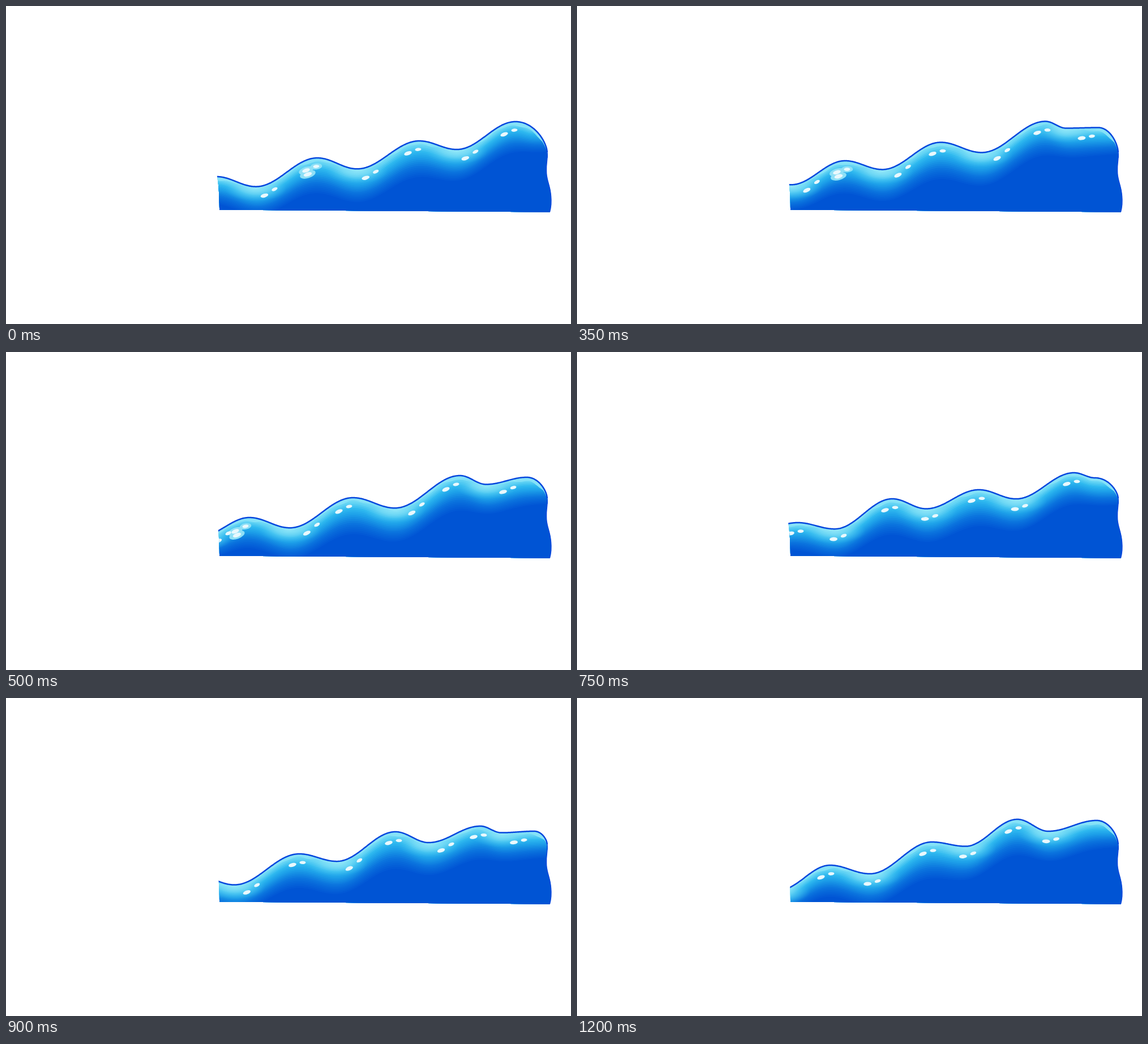
An HTML page with a canvas for the animation above (1350 ms loop, 998 px wide and 561 px high).

```html
<!DOCTYPE html>
<html lang="en">
<head>
<meta charset="utf-8">
<title>Water waves</title>
<style>
  html, body { margin: 0; width: 100%; height: 100%; overflow: hidden; background: #fff; }
  canvas { display: block; }
</style>
</head>
<body>
<canvas id="stage" width="998" height="561"></canvas>
<script>
const ctx = document.getElementById('stage').getContext('2d');
const LOOP = 1350;
const LEFT = 368, RIGHT = 956;
const END_Y = 258;

// A pose is its crests; shine is how far the glints sit from each crest and trough.
const pose = (crests, onCrest, inTrough, foam = false) => ({ crests, onCrest, inTrough, foam });

const swell = pose([[372, 301], [550, 268], [730, 238], [900, 204]], -20, 15, true);
const shoulder = pose([[345, 308], [517, 270], [672, 240], [853, 205], [922, 224]], -4, 25, true);
const twin = pose([[290, 312], [430, 292], [613, 257], [802, 218], [920, 221]], -25, 30, true);
const steep = pose([[225, 300], [390, 301], [557, 259], [710, 243], [878, 213], [915, 222]], -13, -2);
const low = pose([[330, 310], [518, 275], [688, 236], [838, 226], [933, 235]], -12, 22);
const trough = pose([[300, 330], [447, 295], [627, 254], [778, 214], [918, 216]], -16, -4);

function between(a, b, lift) {
  const mid = (p, q) => (p + q) / 2;
  const crests = a.crests.map(([x, y], i) => {
    // steep has one more wave on the left of its matching crest
    const [bx, by] = b.crests[i];
    return [mid(x, bx), mid(y, by) - lift];
  });
  return pose(crests, mid(a.onCrest, b.onCrest), mid(a.inTrough, b.inTrough), a.foam && b.foam);
}

const steps = [
  [0, swell],
  [150, shoulder],
  [350, between(shoulder, twin, 8)],
  [500, twin],
  [600, between(twin, steep, 5)],
  [750, steep],
  [900, low],
  [1050, between(low, trough, -3)],
  [1200, trough]
];

// Wide gaps between crests sag into a trough; narrow ones only form a shoulder.
function troughsOf(crests) {
  return crests.slice(1).flatMap(([x, y], i) => {
    const [px, py] = crests[i], gap = x - px;
    if (gap < 80) return [];
    return [[px + gap * 0.39, py + (y - py) * 0.39 + (gap - 65) * 0.27]];
  });
}

// Cosine slopes between turning points, then a rounded shoulder down to the right end.
function surface(turns) {
  const [lastX, lastY] = turns[turns.length - 1];
  const ys = [];
  for (let x = LEFT, k = 0; x <= RIGHT; x++) {
    if (x >= lastX) {
      const u = (x - lastX) / (RIGHT - lastX);
      ys.push(lastY + (END_Y - lastY) * (1 - (1 - u * u) ** 0.65));
      continue;
    }
    while (x > turns[k + 1][0]) k++;
    const [ax, ay] = turns[k], [bx, by] = turns[k + 1];
    const t = Math.max(0, (x - ax) / (bx - ax));
    ys.push(ay + (by - ay) * (1 - Math.cos(Math.PI * t)) / 2);
  }
  return ys;
}

function smooth(ys, radius) {
  const r = Math.round(radius), last = ys.length - 1;
  const box = src => src.map((_, i) => {
    let sum = 0;
    for (let j = i - r; j <= i + r; j++) sum += src[Math.min(last, Math.max(0, j))];
    return sum / (2 * r + 1);
  });
  return box(box(ys));
}

const ramp = [[0, 130, 225, 247], [8, 96, 210, 244], [17, 46, 184, 239], [27, 28, 158, 232], [42, 10, 113, 221], [59, 0, 84, 212]];
function shade(depth) {
  const k = Math.max(1, ramp.findIndex(stop => stop[0] >= depth));
  const a = ramp[k - 1], b = ramp[k];
  const t = (depth - a[0]) / (b[0] - a[0]);
  return `rgb(${[1, 2, 3].map(i => Math.round(a[i] + (b[i] - a[i]) * t))})`;
}

const trace = ys => ys.forEach((y, i) => ctx.lineTo(LEFT + i, y));

function rightEdge() {
  ctx.bezierCurveTo(957, 272, 954, 276, 954.5, 290);
  ctx.bezierCurveTo(954, 308, 961, 314, 962.5, 335);
  ctx.quadraticCurveTo(964, 350, 960.5, 363);
}

function fillBelow(ys, color) {
  ctx.fillStyle = color;
  ctx.beginPath();
  ctx.moveTo(LEFT, 370);
  trace(ys);
  ctx.lineTo(970, ys[ys.length - 1]);
  ctx.lineTo(970, 370);
  ctx.fill();
}

function glow(x, y) {
  ctx.save();
  ctx.translate(x, y + 3);
  ctx.scale(1, 0.42);
  const light = ctx.createRadialGradient(0, 0, 0, 0, 0, 55);
  light.addColorStop(0, 'rgba(146,231,248,.8)');
  light.addColorStop(0.45, 'rgba(126,222,246,.5)');
  light.addColorStop(1, 'rgba(70,195,240,0)');
  ctx.fillStyle = light;
  ctx.fillRect(-60, -60, 120, 120);
  ctx.restore();
}

function oval(x, y, rx, ry, tilt, color) {
  ctx.fillStyle = color;
  ctx.beginPath();
  ctx.ellipse(x, y, rx, ry, tilt, 0, Math.PI * 2);
  ctx.fill();
}

function drawDepth(ys) {
  // shading stays level below the steep right end
  const calm = ys.map((_, i) => ys[Math.min(i, 925 - LEFT)]);
  const reach = i => 0.78 + 0.27 * Math.sin(Math.PI * i / ys.length);
  fillBelow(ys, shade(0));
  for (let d = 2; d <= 59; d += 3) {
    const soft = smooth(calm, d * 0.38);
    fillBelow(soft.map((y, i) => y + d * reach(i)), shade(d));
  }
}

function drawRim(ys) {
  const wide = smooth(ys, 22);
  ctx.fillStyle = '#86e2f7';
  ctx.beginPath();
  trace(ys);
  for (let i = ys.length - 1; i >= 0; i--) {
    const crest = Math.max(0, wide[i] - ys[i]);
    const wobble = Math.sin(i / 5) + Math.sin(i / 8.3);
    ctx.lineTo(LEFT + i, ys[i] + 4.5 + Math.min(5, crest * 0.6) + wobble * 0.8);
  }
  ctx.fill();
}

function drawGlints(ys, x, foam) {
  const at = px => ys[Math.min(ys.length - 1, Math.max(0, Math.round(px) - LEFT))];
  const spots = [[x, 18, 7], [x + 18, 15, 5.5]];
  if (foam) spots.push([x + 3, 26, 7.5]);
  const paint = (grow, color) => spots.forEach(([px, depth, r]) => {
    const tilt = Math.atan((at(px + 8) - at(px - 8)) / 16) * 0.7 - 0.08;
    const thick = Math.min(3.5, r * 0.35 + 0.9);
    oval(px, at(px) + depth, r * grow, thick * grow, tilt, color);
  });
  if (foam) paint(1.9, '#8fe0f6');
  paint(1, '#e9f8fd');
}

function draw({ crests, onCrest, inTrough, foam }) {
  const troughs = troughsOf(crests);
  const ys = surface([...crests, ...troughs].sort((a, b) => a[0] - b[0]));
  ctx.clearRect(0, 0, 998, 561);
  ctx.save();

  // slanted left side and flat bottom
  ctx.beginPath();
  ctx.moveTo(371, 290);
  ctx.quadraticCurveTo(377, 318, 377, 359.5);
  ctx.lineTo(960, 363.5);
  ctx.lineTo(980, 363.5);
  ctx.lineTo(980, 150);
  ctx.lineTo(371, 150);
  ctx.clip();

  ctx.save();
  ctx.beginPath();
  ctx.moveTo(LEFT, 370);
  trace(ys);
  rightEdge();
  ctx.lineTo(960, 370);
  ctx.clip();
  drawDepth(ys);
  drawRim(ys);
  troughs.forEach(([x, y]) => glow(x, y));
  crests.forEach(([x], i) => {
    if (x < 905) drawGlints(ys, x + onCrest, foam && i === 1);
  });
  troughs.forEach(([x]) => drawGlints(ys, x + inTrough, false));
  ctx.restore();

  ctx.strokeStyle = '#0546dd';
  ctx.lineJoin = 'round';
  ctx.lineWidth = 2.5;
  ctx.beginPath();
  trace(ys);
  ctx.stroke();
  ctx.lineWidth = 1.5;
  ctx.beginPath();
  ctx.moveTo(RIGHT, END_Y);
  rightEdge();
  ctx.stroke();
  ctx.restore();
}

// The extra far-left wave would shift the matching, so blend with it removed.
steps[4][1] = between(
  { ...twin, crests: twin.crests.slice(1) },
  { ...steep, crests: steep.crests.slice(1) }, 5);

const start = performance.now();
let shown = null;
function tick() {
  const t = (performance.now() - start) % LOOP;
  const current = steps.filter(([from]) => from <= t).pop()[1];
  if (current !== shown) draw(shown = current);
  requestAnimationFrame(tick);
}
tick();
</script>
</body>
</html>
```
